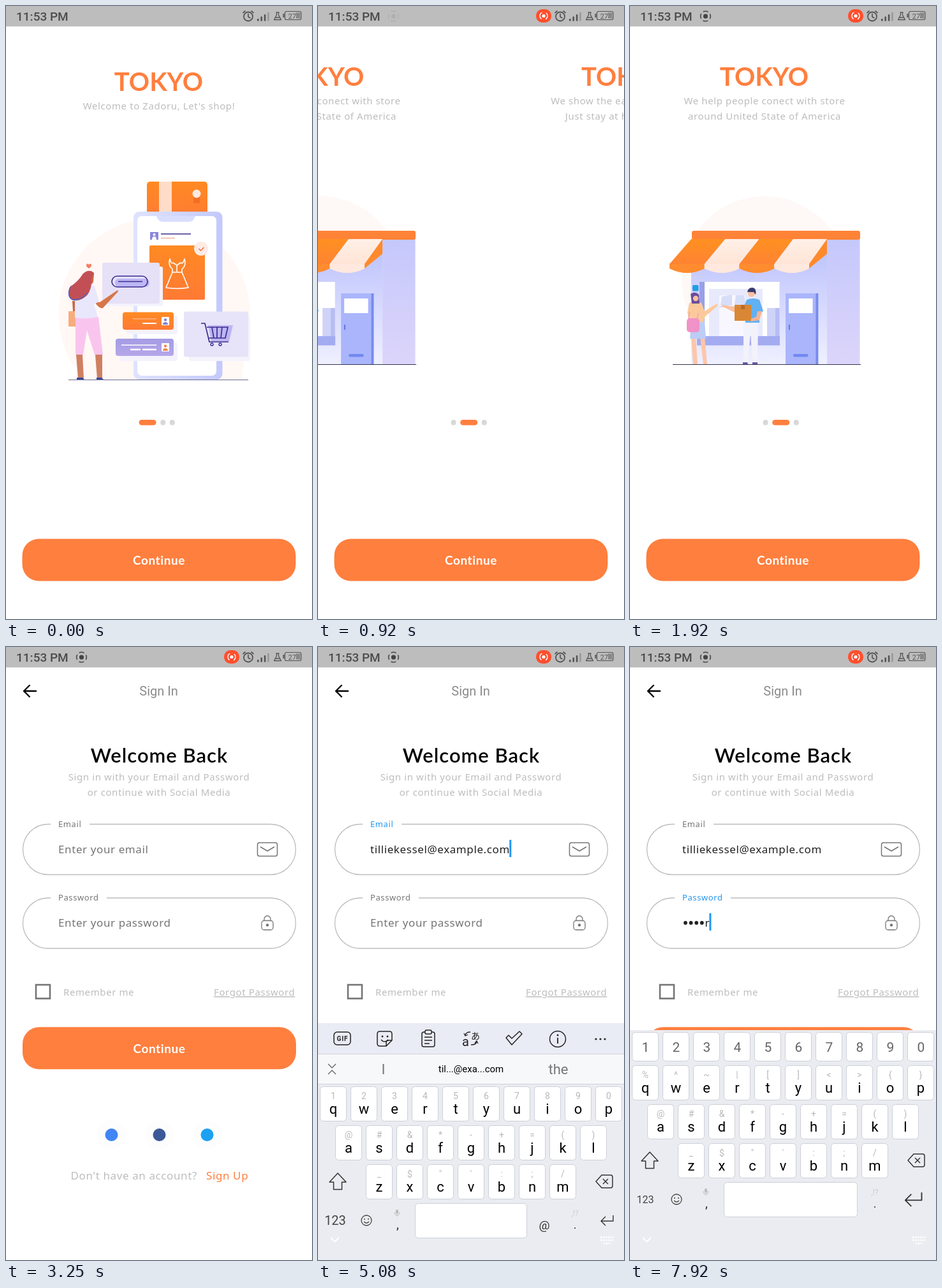
Recreate the animation shown at these times as an HTML page. Size 480 by 960 pixels, loop 8000 ms.

```html
<!DOCTYPE html>
<html lang="en">
<head>
<meta charset="utf-8">
<title>Shop onboarding</title>
<style>
html, body { margin: 0; height: 100%; overflow: hidden; background: #fff; }
svg { display: block; width: 100vw; height: 100vh; }
text { font-family: "Noto Sans", sans-serif; letter-spacing: .6px; white-space: pre; }
.r { font-family: Roboto, sans-serif; letter-spacing: 0; }
.h { font-family: Lato, sans-serif; font-weight: 700; }
.title { letter-spacing: 0; }
.welcome { font-weight: 600; letter-spacing: 1px; }
.m { text-anchor: middle; }
</style>
</head>
<body>
<svg id="stage" viewBox="0 0 480 960"></svg>
<script>
const LOOP = 8000, ORANGE = '#ff7f3e', GREY = '#bdbdbd', DARK = '#757575', BLUE = '#2196f3', INK = '#3b2d8f';
const EMAIL = 'tilliekessel@example.com', SECRET = 'tiger';

const esc = s => s.replace(/&/g, '&amp;').replace(/</g, '&lt;');
const rect = (x, y, w, h, fill, r = 0, more = '') =>
  `<rect x="${x}" y="${y}" width="${w}" height="${h}" rx="${r}" fill="${fill}" ${more}/>`;
const dot = (x, y, r, fill, more = '') => `<circle cx="${x}" cy="${y}" r="${r}" fill="${fill}" ${more}/>`;
const shape = (d, fill) => `<path d="${d}" fill="${fill}"/>`;
const line = (d, stroke, w = 1.5, more = '') =>
  `<path d="${d}" fill="none" stroke="${stroke}" stroke-width="${w}" stroke-linejoin="round" ${more}/>`;
const text = (x, y, size, s, fill, cls = '', more = '') =>
  `<text x="${x}" y="${y}" font-size="${size}" fill="${fill}" class="${cls}" ${more}>${esc(s)}</text>`;
const group = (id, body) => `<g id="${id}">${body}</g>`;
const outline = (color, w) => `stroke="${color}" stroke-width="${w}"`;
const gradient = (id, a, b, dir = 'x2="0" y2="1"') =>
  `<linearGradient id="${id}" ${dir}><stop stop-color="${a}"/><stop offset="1" stop-color="${b}"/></linearGradient>`;

const defs = '<defs>' +
  gradient('wall', '#b9bffc', '#eff0ff') + gradient('side', '#c5c8fc', '#dcd5fa') +
  gradient('awning', '#ff9020', '#ff7f3a') + gradient('pale', '#fff0e8', '#ffe0cf') +
  gradient('bar', '#a49ce4', '#b6a6ea') + gradient('card', '#ff8a22', '#ff7a35') +
  gradient('phone', '#dfe3ff', '#c3c9fb', 'x2="1" y2="0"') + '</defs>';

const avatar = (x, y, c) => rect(x, y, 12, 13, '#fff', 1) + dot(x + 6, y + 4.5, 2.2, c) +
  shape(`M${x + 2} ${y + 12}q0 -4 4 -4q4 0 4 4z`, c);

const phoneScene =
  shape('M104 560A150 150 0 1 1 375 530L370 585H130z', '#fff8f5') +
  rect(221, 275, 95, 60, 'url(#card)', 5) + rect(240, 275, 20, 50, '#ffdcc8') +
  rect(294, 296, 10, 13, '#f26f25') + dot(299, 294, 6.5, '#ffeadd') +
  rect(200, 322, 139.5, 263, 'url(#phone)', 9) + rect(206, 329, 124, 250, '#fff', 7) +
  shape('M236 329h61q-3 9 -10 9h-41q-7 0 -10 -9z', '#d9defd') +
  rect(226, 354, 13, 12, '#8c86dc') + dot(232.5, 358, 2, '#fff') + shape('M229 366q0 -5 3.5 -5t3.5 5z', '#fff') +
  line('M243 357H290', INK) + line('M243 363.5H265', '#e8a98a', 1.2) +
  rect(225, 375, 87, 85, 'url(#card)', 2) + dot(306, 380, 11, '#fdebe4') + line('M302.5 380l3 3l5 -5', '#f0623a', 1.4) +
  line('M257 396q2 9 5 6l6 4l6 -4q4 3 6 -6q3 11 -4 16v5l10 24q-18 3 -35 0l10 -24v-5q-7 -6 -4 -16zM261 417h15M268 406v10', '#fff', 1.6) +
  rect(157, 408, 89, 62, '#f3f2fd', 3) + rect(151, 402, 90, 64, '#e6e1f7', 3) +
  rect(171, 427, 54, 13, '#bcb7f4', 6) +
  rect(166, 423, 56, 17, 'none', 8.5, outline(INK, 1.6)) + line('M176 431.5H214', INK) +
  rect(189, 485, 80, 29, '#f3f2fd', 4) + rect(183, 479.5, 80, 27.5, 'url(#card)', 4) +
  line('M199 490H236', '#ffb27c', 1.5) + line('M214 497H236', '#fff', 2) + avatar(244, 487, '#8680d8') +
  rect(178, 527, 91, 29, '#f3f2fd', 4) + rect(172, 521, 91, 27, 'url(#bar)', 4) +
  line('M181 531H236', '#fff', 1.5) + line('M195 538H211M214 538H236', '#fff', 2.6) + avatar(244, 528, '#f08a4b') +
  rect(287, 486, 96, 70, '#f5f4fd', 3) + rect(279, 478.5, 101, 71, '#e7e3f8', 3) +
  shape('M317 500H356L350 525H322z', '#bdb5f3') +
  line('M306 497h6l7 29h30M315 503h33l-4 17h-26M323 503l3 17M331 503v17M339 503l-2 17', INK, 1.7) +
  dot(323, 530, 2, 'none', outline(INK, 1.4)) + dot(336, 530, 2, 'none', outline(INK, 1.4)) +
  line('M98 585.5H380', '#6f6c96', 1) +
  // shopper
  shape('M130 411q-5 -3 -4 -6q2 -3 4 0q2 -3 4 0q1 3 -4 6', '#f28062') +
  rect(98, 478, 12, 24, '#f7ac7c', 1) + shape('M104 462h8l-1 16h-6z', '#c8663f') +
  shape('M139 463l8 1l28 -19l1 2l-24 26q-5 2 -12 -8z', '#d77749') +
  shape('M110 546h10l2 38h-9zM140 546h11l0 38h-8z', '#cf7f62') +
  shape('M109 487h36l7 59h-13l-12 -38l-6 38h-12z', '#f9c5ee') +
  shape('M108 438q16 -6 31 1l7 24l-8 4l6 20q-16 4 -36 1z', '#e9e7fc') +
  shape('M123 419q10 -8 15 0l-1 13q-3 6 -9 4z', '#d0663f') +
  shape('M138 418q-8 -7 -17 1q-9 14 -20 20q-8 15 4 22q13 2 23 -9q7 -10 6 -24z', '#c24f55') +
  line('M101 440q-6 16 4 20q13 1 22 -10', '#5561c0', 1.6) +
  shape('M111 582h9l3 3h-12zM142 582h8l3 3h-11z', '#36459c');

const awning = [0, 1, 2, 3].map(i => {
  const top = 95 + i * 53.3, low = 61 + i * 54.8, fill = `url(#${i % 2 ? 'pale' : 'awning'})`;
  return shape(`M${top} 365h53.3L${low + 54.8} 404v7q-27 14 -54.8 0v-7z`, fill) +
    shape(`M${low} 404h54.8v7q-27 14 -54.8 0z`, i % 2 ? '#ffe9de' : '#ff8c2e');
}).join('');

const storeScene =
  dot(210, 428, 130, '#fef8f6') +
  rect(95, 365, 213, 196, 'url(#wall)') + rect(308, 365, 51.5, 196, 'url(#side)') +
  rect(96, 352, 264, 14, '#ff8336', 3) + awning + shape('M308 365v23L280 411v-7z', '#ff8a2c') +
  rect(97, 437, 9.5, 9.5, '#1f9fe2', 2) +
  rect(104, 516, 130, 15.5, '#a3acf1') + rect(108, 432, 8, 85, '#98a0e8') + rect(116, 432, 117.5, 85, '#fff') +
  rect(123, 443, 84, 74, '#e8eafc') + rect(139, 453, 41, 64, '#f8f7ff') +
  shape('M143 455l16 -3v17h-18zM165 453h13l3 15h-18z', '#d6def8') + rect(139, 470, 40, 2, '#dcd8ef') +
  rect(214, 473, 19.5, 44, '#cfd3f8') + rect(227, 473, 6.5, 44, '#b7bdf4') +
  rect(243, 450, 51, 111.5, '#aab5fb') + rect(290.5, 450, 3.8, 111.5, '#768bee') +
  rect(248, 458, 37.5, 23, '#fff') + rect(248, 499, 1.8, 8, '#5f72df') + rect(255, 545, 23.5, 4.5, '#7288f0', 2) +
  line('M66 561.5H361', '#33334f', 1) +
  // customer
  shape('M95 518h7l3 43h-7zM109 518h7l4 43h-6z', '#fcc6a8') +
  shape('M95 493h21l2 28h-25z', '#bccdf6') +
  shape('M92 465q10 -4 19 0l5 13l16 -10l5 -2l-1 4l-19 16l-3 9h-21l-4 -15z', '#fcc99c') +
  shape('M94 451q7 -5 13 1l1 14h-12z', '#6d4c9b') + dot(102, 458, 4.2, '#fbc0a0') +
  line('M93 479q-3 8 -2 14M104 489l3 -8', '#f5a0b0', 1.4) + rect(88, 489, 20, 22, '#f092c8', 5) +
  // shopkeeper
  shape('M177 494h23l-1 66h-8l-3 -50l-4 50h-7z', '#f2f2fb') +
  shape('M176 558h7l1 3h-8zM191 558h8v3h-8z', '#6a57a8') +
  shape('M183 461l-8 12l-31 -5l-1 2l22 11h14z', '#fbc0a0') +
  shape('M182 460q10 -4 20 0l6 18l-6 3v15h-22l-1 -28z', '#61b1f3') +
  shape('M199 478l7 0l-4 14l-14 2v-4l9 -3z', '#f6b394') +
  dot(189.5, 450, 5.6, '#fbc0a0') + shape('M183 448q1 -7 8 -7q7 1 5 11l-3 -4z', '#3b3a6e') +
  rect(163, 468, 26, 25, '#d98736') + rect(173, 468, 6, 7, '#b96c28');

const heading = (y, ...lines) => text(239.5, y, 40, 'TOKYO', ORANGE, 'm h title') +
  lines.map((s, i) => text(240, y + 29 + 24 * i, 15, s, GREY, 'm')).join('');
const page = (i, body) => `<g transform="translate(${480 * i})">${body}</g>`;
const button = (x, y) => rect(x, y, 429, 66, ORANGE, 26) + text(x + 214.5, y + 40.5, 19, 'Continue', '#fff', 'm h');

const onboarding = group('pages',
  page(0, heading(133, "Welcome to Zadoru, Let's shop!") + phoneScene) +
  page(1, heading(125, 'We help people conect with store', 'around United State of America') +
    `<g transform="translate(30)">${storeScene}</g>`) +
  page(2, heading(125, 'We show the easy way to shop.', 'Just stay at home with us'))) +
  [0, 1, 2].map(i => rect(0, 648, 8, 8.4, '#d8d8d8', 4.2, `id="dot${i}"`)).join('') + button(25.5, 834.5);

const field = (y, id, label, gap) =>
  line(`M${gap} ${y}H415a39.5 39.5 0 0 1 0 79H66a39.5 39.5 0 0 1 0 -79H70`, GREY, 1.3) +
  text(82, y + 4, 13, label, DARK, '', `id="${id}"`);

const signIn = rect(0, 0, 480, 960, '#fff') +
  line('M48 69H28M37.5 59.5L28 69L37.5 78.5', '#000', 2.4) +
  text(239.5, 76, 20, 'Sign In', '#8b8b8b', 'r m') +
  text(240.5, 181, 31, 'Welcome Back', '#000', 'm h welcome') +
  text(240, 209, 15, 'Sign in with your Email and Password', GREY, 'm') +
  text(240, 233, 15, 'or continue with Social Media', GREY, 'm') +
  field(277.5, 'mailLabel', 'Email', 131) + field(393, 'passLabel', 'Password', 158) +
  text(82, 323, 17, '', DARK, '', 'id="mail"') + text(82, 438, 17, '', DARK, '', 'id="pass"') +
  [0, 1, 2, 3].map(i => dot(87 + 8.6 * i, 432, 2.9, '#222', `id="star${i}"`)).join('') +
  rect(0, 302, 3, 27, BLUE, 0, 'id="caret"') +
  rect(394.5, 306.5, 31, 21, 'none', 3, outline(DARK, 1.5)) + line('M399 313l11 6.5l11 -6.5', DARK) +
  rect(401, 428.5, 18, 14.5, 'none', 4, outline(DARK, 1.3)) +
  line('M405 428.5v-2.5a5 5 0 0 1 10 0v2.5', DARK, 1.3) + dot(410, 435.5, 2.2, DARK) +
  rect(47, 529, 22, 21.5, 'none', 0, outline(DARK, 2.6)) +
  text(90, 546, 15, 'Remember me', GREY) +
  text(326, 546, 15, 'Forgot Password', GREY, '', 'text-decoration="underline"') +
  button(26, 595.3) +
  ['#4285f4', '#3b5998', '#1da1f2'].map((c, i) =>
    dot(165.5 + 75 * i, 764, 23, '#fdfdfe') + dot(165.5 + 75 * i, 764, 10, c)).join('') +
  text(101.5, 834, 17, "Don't have an account?", GREY) + text(314, 834, 17, 'Sign Up', ORANGE);

const PAPER = '#ebecf1', KEY_INK = '#333', TOOL = outline('#222', 1.5);
const key = (x, y, w = 42, h = 55) => rect(x + .5, y + .5, w - 1, h - 1, '#fff', 5, 'stroke="#ccd0d8"');
const letters = (y, hints) => ['qwertyuiop', 'asdfghjkl', 'zxcvbnm'].map((row, r) =>
  [...row].map((c, i) => {
    const x = [3, 27, 75][r] + 48 * i, top = y + 61 * r;
    return key(x, top) + text(x + 21, top + 20, 14, hints[r][i], '#b8b8b8', 'r m') +
      text(x + 21, top + 43, 22, c, '#000', 'r m');
  }).join('')).join('') +
  line(`M31 ${y + 136}l13 14h-6.5v11.5h-13v-11.5h-6.5z`, KEY_INK) +
  line(`M436 ${y + 149}l9 -10h14q3 0 3 3v14q0 3 -3 3h-14zM447 ${y + 145}l8 8m0 -8l-8 8`, KEY_INK);

const smiley = (x, y) => dot(x, y, 8, 'none', outline('#444', 1.3)) +
  dot(x - 3, y - 2, 1, '#444') + dot(x + 3, y - 2, 1, '#444') + line(`M${x - 4} ${y + 2}q4 4 8 0`, '#444', 1.2);
const bottomRow = (y, x, size, comma, space, width, stop, enter, zoom) =>
  text(x, y + 27 + size * .36, size, '123', '#444', 'r m') + smiley(x + 49, y + 27) +
  rect(comma - 3, y + 10, 4, 7, '#bbb', 2) + line(`M${comma - 5} ${y + 14}q0 5 4 5t4 -5m-4 5v2`, '#bbb', 1) +
  text(comma, y + 40, 20, ',', KEY_INK, 'r m') + key(space, y, width) +
  text(stop, y + 20, 12, ',!?', '#ccc', 'r m') + text(stop, y + 40, 18, '.', KEY_INK, 'r m') +
  line('M10 -8v9h-19m7 -7l-7 7l7 7', KEY_INK, 1.4, `transform="translate(${enter} ${y + 27}) scale(${zoom})"`) +
  line('M20 925l6.5 6.5l6.5 -6.5', '#fff', 2) +
  line('M443 924.5H464M443 929H464M448 934H459', '#fff', 2.4, 'stroke-dasharray="2.5 1.5"');

const LOWER_HINTS = ['@#&*-+=()', '_$"\':;/'];
const toolbar = rect(0, 589, 480, 48, '#e9ecf4') + rect(0, 637, 480, 48, '#f7f8fa') +
  line('M0 637.5H480M0 684.5H480', '#cfd3da', 1) +
  rect(25, 603, 26, 20, 'none', 5, TOOL) +
  text(38.5, 617, 10, 'GIF', '#222', 'r m', 'font-weight="700" style="letter-spacing:1px"') +
  line('M97 602h15q4 0 4 4v10l-9 9h-10q-4 0 -4 -4v-15q0 -4 4 -4M116 616h-5q-4 0 -4 4v5M99 615q5 6 11 0', '#222') +
  dot(101, 610, 1.4, '#222') + dot(109, 610, 1.4, '#222') +
  rect(163, 603, 20, 23, 'none', 3, TOOL) + rect(168, 600, 10, 6, '#e9ecf4', 2, TOOL) +
  line('M167 611h12M167 616h12M167 621h8', '#222', 1.3) +
  text(226, 625, 20, 'a', '#222', 'r') +
  text(240, 614, 14, 'あ', '#222', '', 'style="font-family:\'Noto Sans CJK JP\',\'Noto Sans CJK\',sans-serif;letter-spacing:0"') +
  line('M239 603q-7 0 -8 5m-2 -3l2 4l4 -2M240 623q8 0 9 -5m-3 2l3 -3l2 4', '#222', 1.3) +
  line('M295 612l4 -4l5 5l12 -11l4 4l-16 17z', '#222') +
  dot(376, 614, 12.5, 'none', TOOL) + dot(376, 608, 1.4, '#222') + line('M376 612v9', '#222', 1.8) +
  [436, 443, 450].map(x => dot(x, 614, 1.6, '#222')).join('') +
  line('M16 653l6 6l6 -6M16 669l6 -6l6 6', '#666', 1.4) +
  text(102.5, 669, 22, 'I', '#777', 'r m') + text(240, 666, 15, 'til...@exa...com', '#000', 'r m') +
  text(377, 669, 22, 'the', '#777', 'r m');

const mailKeys = rect(0, 589, 480, 371, PAPER) + toolbar + letters(688, ['1234567890', ...LOWER_HINTS]) +
  bottomRow(871, 27, 20, 125, 152, 176, 403, 453, 1) + text(355, 912, 19, '@', KEY_INK, 'r m');

const passKeys = rect(0, 600, 480, 360, PAPER) +
  [...'1234567890'].map((c, i) => key(3 + 48 * i, 603, 42, 46) + text(24.5 + 48 * i, 634, 21, c, '#666', 'r m')).join('') +
  letters(655, ['%^~|[]<>{}', ...LOWER_HINTS]) + bottomRow(838, 24, 16, 120, 147, 210, 384, 444, 1.35);

const SB = '#555';
const status = rect(0, 0, 480, 32, GREY) + text(16, 23, 19, '11:53 PM', '#4c4c4c', 'r', 'font-weight="500"') +
  group('notice', dot(118.5, 16, 3.6, '#444') +
    dot(118.5, 16, 7.8, 'none', outline(SB, 1.8) + ' stroke-dasharray="8.25 4" stroke-dashoffset="4.1"')) +
  group('badge', rect(342, 5, 24, 21, '#ff4f2e', 10) + dot(354, 15.5, 2.6, '#fff') +
    dot(354, 15.5, 6, 'none', outline('#fff', 1.4) + ' stroke-dasharray="12 6.85" stroke-dashoffset="6"')) +
  dot(380, 16.5, 7, 'none', outline(SB, 1.8)) + line('M380 12v5l3.5 2M371.5 11l4 -3.5M388.5 11l-4 -3.5', SB, 1.7) +
  [0, 1, 2, 3].map(i => rect(394 + 5.4 * i, 20 - 3.4 * i, 2.6, 3.5 + 3.4 * i, i < 3 ? SB : '#999')).join('') +
  line('M423.5 10h5M424.5 10v4l-4 7.5h11l-4 -7.5v-4M422 18h8', SB, 1.3) +
  rect(437.5, 8.5, 25.5, 13, 'none', 2.5, outline(SB, 1.2)) + rect(434.5, 12, 2, 6, SB) +
  rect(455, 10.5, 6.5, 9, '#888') + text(449, 19.5, 11, '27', SB, 'r m');

const stage = document.getElementById('stage');
stage.innerHTML = defs + group('intro', onboarding) + group('login', signIn) +
  group('mailKeys', mailKeys) + group('passKeys', passKeys) + status;

const $ = id => document.getElementById(id);
const set = (id, attrs) => { for (const k in attrs) $(id).setAttribute(k, attrs[k]); };
const show = (id, on) => set(id, { visibility: on ? 'visible' : 'hidden' });
const ramp = (t, a, b) => Math.min(1, Math.max(0, (t - a) / (b - a)));
const smooth = u => u * u * (3 - 2 * u);
const easeOut = u => 1 - (1 - u) ** 3;

// start, end, direction of each swipe
const SWIPES = [[80, 500, 1], [750, 1095, 1], [1500, 1995, -1]];
const ROUTE = 2570, MAIL_FOCUS = 3770, KEYS_UP = 4070, MAIL_FILL = 5020, PASS_FOCUS = 5850;
const TYPED = [6620, 6950, 7270, 7590, 7880];

function drawIntro(t) {
  let scroll = 0, current = 0;
  for (const [a, b, way] of SWIPES) {
    scroll += way * 480 * smooth(ramp(t, a, b));
    const half = (a + b) / 2;
    current += way * ramp(t, half, half + 150);
  }
  set('pages', { transform: `translate(${-scroll})` });
  let x = 208.6;
  for (let i = 0; i < 3; i++) {
    const on = Math.max(0, 1 - Math.abs(current - i)), width = 8 + 19 * on;
    const mix = (a, b) => Math.round(a + (b - a) * on);
    set('dot' + i, { x, width, fill: `rgb(${mix(216, 255)},${mix(216, 127)},${mix(216, 62)})` });
    x += width + 6.6;
  }
}

function drawLogin(t) {
  const u = ramp(t, ROUTE, ROUTE + 300);
  set('login', { opacity: u * u, transform: `translate(0 ${240 * (1 - easeOut(u))})` });

  const onPass = t >= PASS_FOCUS, onMail = t >= MAIL_FOCUS && !onPass, filled = t >= MAIL_FILL;
  const count = TYPED.filter(at => t >= at).length;
  set('mailLabel', { fill: onMail ? BLUE : DARK });
  set('passLabel', { fill: onPass ? BLUE : DARK });

  $('mail').textContent = filled ? EMAIL : 'Enter your email';
  set('mail', { fill: filled ? '#222' : DARK });
  $('pass').textContent = count ? SECRET[count - 1] : 'Enter your password';
  set('pass', { fill: count ? '#222' : DARK, x: count ? 83 + 8.6 * (count - 1) : 82 });
  for (let i = 0; i < 4; i++) show('star' + i, i < count - 1);

  const last = Math.max(...[MAIL_FOCUS, MAIL_FILL, PASS_FOCUS, ...TYPED].filter(at => at <= t));
  const box = onPass ? $('pass') : $('mail');
  const typed = onPass ? count : filled;
  const x = typed ? +box.getAttribute('x') + box.getComputedTextLength() - .6 : 82.5;
  set('caret', { x, y: onPass ? 417 : 302 });
  show('caret', (onMail || onPass) && Math.floor((t - last) / 500) % 2 === 0);

  set('mailKeys', { transform: `translate(0 ${372 * (1 - easeOut(ramp(t, KEYS_UP, KEYS_UP + 160)))})` });
  show('mailKeys', t >= KEYS_UP && !onPass);
  show('passKeys', onPass);
}

function frame(now) {
  const t = now % LOOP;
  drawIntro(t);
  drawLogin(t);
  show('badge', t >= 500);
  set('notice', { opacity: .1 * ramp(t, 800, 900) + .9 * ramp(t, 920, 1150) });
  requestAnimationFrame(frame);
}
requestAnimationFrame(frame);
</script>
</body>
</html>
```
